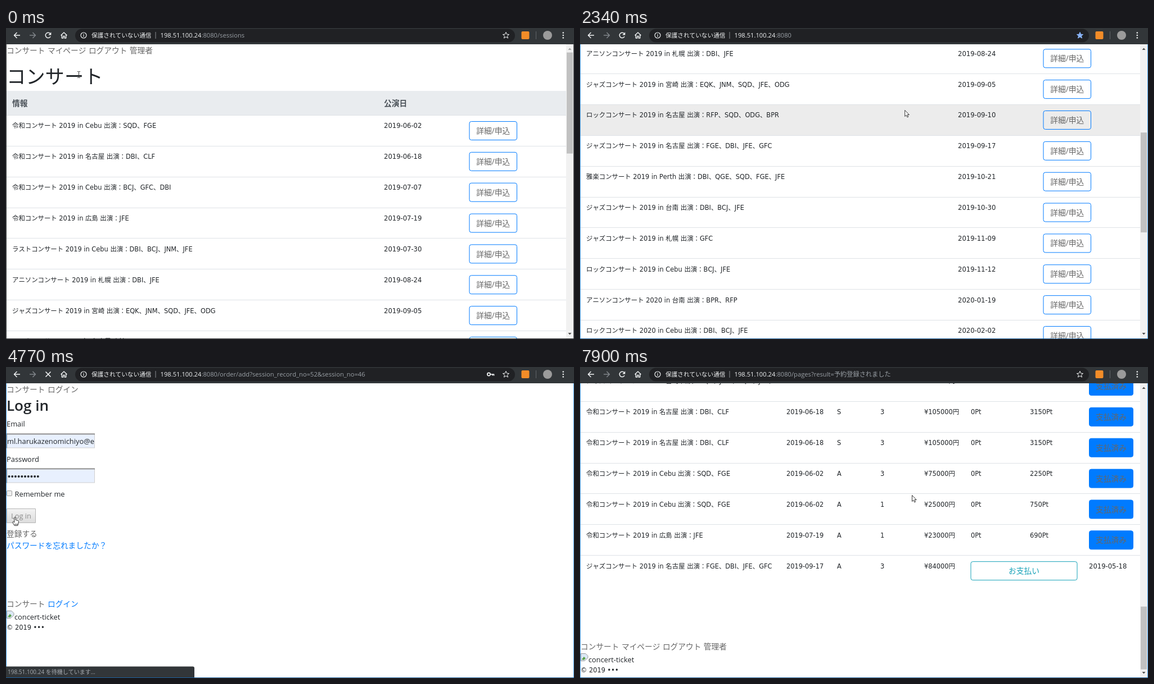
An HTML page with a canvas for the animation above (8000 ms loop, 1010 by 554 pixels).

```html
<!DOCTYPE html>
<html lang="ja">
<head>
<meta charset="utf-8">
<title>チケット予約</title>
<style>
html, body { margin: 0; width: 100%; height: 100%; overflow: hidden; background: #fff; }
canvas { display: block; }
</style>
</head>
<body>
<canvas id="stage" width="1010" height="554"></canvas>
<script>
const g = document.getElementById('stage').getContext('2d');
g.fontKerning = 'none';

const CJK = '"Noto Sans CJK JP", "Noto Sans CJK", sans-serif';
const UI = '"Open Sans", ' + CJK, WIDE = '"DejaVu Sans", ' + CJK;
const EM = 13.71, LATIN = 12.85, SMALL = 11.4, ROW = 54.857;
const INK = '#212529', GRAY = '#666', BLUE = '#007bff', TEAL = '#17a2b8';
const HOST = '198.51.100.24', PORT = ':8080';
const WAIT = HOST + ' を待機しています...';
const ORDER = '/order/add?session_record_no=52&session_no=46';
const MEMBER = ['コンサート', 'マイページ', 'ログアウト', '管理者'];
const GUEST = ['コンサート', 'ログイン'];

const concerts = `令和 2019-06-02 Cebu SQD、FGE
令和 2019-06-18 名古屋 DBI、CLF
令和 2019-07-07 Cebu BCJ、GFC、DBI
令和 2019-07-19 広島 JFE
ラスト 2019-07-30 Cebu DBI、BCJ、JNM、JFE
アニソン 2019-08-24 札幌 DBI、JFE
ジャズ 2019-09-05 宮崎 EQK、JNM、SQD、JFE、ODG
ロック 2019-09-10 名古屋 RFP、SQD、ODG、BPR
ジャズ 2019-09-17 名古屋 FGE、DBI、JFE、GFC
雅楽 2019-10-21 Perth DBI、QGE、SQD、FGE、JFE
ジャズ 2019-10-30 台南 DBI、BCJ、JFE
ジャズ 2019-11-09 札幌 GFC
ロック 2019-11-12 Cebu BCJ、JFE
アニソン 2020-01-19 台南 BPR、RFP
ロック 2020-02-02 Cebu DBI、BCJ、JFE
雅楽 2020-02-06 広島 BCJ、DBI、QGE
ロック 2020-02-12 札幌 ODG
ジャズ 2020-02-23 Perth SQD、GFC
ラスト 2020-03-08 宮崎 JFE、BPR
アニソン 2020-03-15 広島 DBI、CLF
雅楽 2020-03-29 台南 QGE、FGE`.split('\n').map(line => {
  const [genre, date, city, acts] = line.split(' ');
  return { date, title: `${genre}コンサート ${date.slice(0, 4)} in ${city} 出演：${acts}` };
});

// Bookings: [concert, seat, count, unit price]; the newest ones are at the end.
const bookings = Array.from({ length: 31 }, (_, i) => [i * 5 % 8, 'SA'[i % 2], 1 + i % 3, i % 2 ? 25000 : 35000])
  .concat([[1, 'S', 3, 35000], [1, 'S', 3, 35000], [0, 'A', 3, 25000], [0, 'A', 1, 25000], [3, 'A', 1, 23000], [8, 'A', 3, 28000]]);

// The screen refreshes in bursts: [first, last, count].
const refreshes = [0];
for (const [a, b, n] of [[130, 460, 4], [600, 600, 1], [780, 1540, 8], [1770, 2570, 9], [2690, 2890, 3],
  [3120, 3700, 6], [3900, 4340, 5], [4550, 5320, 8], [5420, 6160, 8], [6270, 6270, 1], [6410, 6710, 4],
  [6920, 7720, 8], [7820, 7900, 2]])
  for (let i = 0; i < n; i++) refreshes.push(Math.floor((a + (b - a) * i / Math.max(1, n - 1)) / 10 + 1e-6) * 10);

const pathKeys = [[130, 129, 83], [460, 38, 40], [780, 38, 40], [1210, 380, 96], [2070, 380, 96], [2570, 873, 221],
  [3120, 873, 221], [3700, 866, 232], [4120, 866, 232], [4340, 560, 246], [4660, 16, 267], [4880, 16, 267],
  [5320, 72, 107], [5520, 72, 107], [6050, 66, 160], [6410, 66, 160], [6600, 48, 148], [6920, 48, 148], [7370, 590, 228]];
const listScroll = [[1210, 0], [1320, 81], [1430, 500], [1540, 934], [1770, 820], [1870, 544], [1970, 440], [2070, 420]];
const userScroll = [[7370, 0], [7490, 120], [7600, 480], [7720, 1000], [7820, 1500], [7900, 1794.7]];

function track(keys, t, col = 1) {
  const i = keys.findIndex(k => k[0] > t);
  if (i < 0) return keys[keys.length - 1][col];
  if (!i) return keys[0][col];
  const a = keys[i - 1], b = keys[i];
  return a[col] + (b[col] - a[col]) * (t - a[0]) / (b[0] - a[0]);
}
const within = (t, ...spans) => spans.some(([a, b]) => t >= a && t < b);
const step = (t, list) => list.filter(s => s[0] <= t).pop()[1];

function box(x, y, w, h, fill) { g.fillStyle = fill; g.fillRect(x, y, w, h); }
function round(x, y, w, h, r, fill, line) {
  g.beginPath();
  g.roundRect(x, y, w, h, r);
  if (fill) { g.fillStyle = fill; g.fill(); }
  if (line) { g.strokeStyle = line; g.lineWidth = 1; g.stroke(); }
}
// y is the vertical middle of the line
function text(s, x, y, size = SMALL, color = INK, font = WIDE, weight = 400, align = 'left') {
  g.font = `${weight} ${size}px ${font}`;
  g.textAlign = align;
  g.fillStyle = color;
  g.fillText(s, x, y + size * .37);
}
function shape(d, x, y, fill, line, width = 1) {
  const p = new Path2D(d);
  g.save();
  g.translate(x, y);
  g.lineWidth = width;
  g.lineJoin = 'round';
  if (fill) { g.fillStyle = fill; g.fill(p); }
  if (line) { g.strokeStyle = line; g.stroke(p); }
  g.restore();
}

function nav(words, y, lastColor = GRAY) {
  let x = 1;
  words.forEach((w, i) => {
    text(w, x, y, EM, i && i == words.length - 1 ? lastColor : GRAY, UI);
    x += w.length * EM + 4.4;
  });
}
function footer(words, y, lastColor) {
  nav(words, y, lastColor);
  shape('M.5 .5H9L13 4.5V8L7 13.5H.5Z', 1, y + 12, '#dce8f5', '#9a9a9a');
  shape('M2 11L6 6L9 9L6 12Z', 1, y + 12, '#5ca04a');
  text('concert-ticket', 15, y + 23.5, LATIN, INK, UI);
  text('© 2019 •••', 1, y + 41.5);
}
function button(s, x, y, w, color, fill, ink) {
  round(x + .5, y + .5, w - 1, 33, 3.5, fill, color);
  text(s, x + w / 2, y + 17, EM, ink, UI, 400, 'center');
}
function classicButton(s, y, w, off) {
  const shade = g.createLinearGradient(0, y, 0, y + 26);
  shade.addColorStop(0, '#f4f4f4');
  shade.addColorStop(1, '#dcdcdc');
  round(1.5, y + .5, w, 25, 0, shade, off ? '#b5b5b5' : '#8a8a8a');
  text(s, 1.5 + w / 2, y + 13, s == 'Log in' ? LATIN : EM, off ? '#8c8c8c' : '#111', UI, 400, 'center');
}
function scrollbar(pos, content) {
  const view = 524, size = 495 * view / content;
  box(996, 29, 13, 525, '#f1f1f1');
  box(997, 43.6 + pos / (content - view) * (495 - size), 11, size, '#c1c1c1');
  shape('M-3 2L0 -1.5L3 2Z', 1002.5, 37, pos ? '#505050' : '#a3a3a3');
  shape('M-3 -2L0 1.5L3 -2Z', 1002.5, 545, '#505050');
}
// Page with a title and a table; drawRow gets the row index and its top edge.
function tablePage(title, heads, count, offset, width, hover, drawRow) {
  nav(MEMBER, 40 + offset);
  text(title, 1, 86 + offset, 34.3, INK, UI);
  const top = 155.5 + offset;
  box(1, top - 43.5, width, 43.5, '#e9ecef');
  for (const [x, s] of heads) text(s, x, top - 21.5, EM, '#495057', UI, 700);
  for (let i = 0; i < count; i++) {
    const y = top + i * ROW;
    if (y < -60 || y > 560) continue;
    if (i == hover) box(1, y, width, ROW, '#ececec');
    box(1, Math.round(y - .5), width, 1, '#dee2e6');
    drawRow(i, y);
  }
  footer(MEMBER, top + count * ROW + 107.5);
}

function listPage(t, cy) {
  const lead = t < 780 ? 0 : 17, pos = track(listScroll, t), offset = lead - pos;
  const hover = t < 1540 ? -1 : t < 2070 ? 15 : Math.floor((cy - 155.5 - offset) / ROW);
  tablePage('コンサート', [[11, '情報'], [672, '公演日']], concerts.length, offset, 995, hover, (i, y) => {
    const on = t >= 2570 && i == hover;
    text(concerts[i].title, 11, y + 18.7);
    text(concerts[i].date, 672, y + 18.7, 11.6);
    if (on && t >= 2890) round(821, y + 8.5, 90, 39, 5, 'rgba(0,123,255,.5)');
    button('詳細/申込', 823.5, y + 10.5, 85.5, BLUE, on && BLUE, on ? '#fff' : GRAY);
  });
  scrollbar(pos, 1441 + lead);
}

function detailPage(t, cy) {
  const hover = Math.floor((cy - 155.5) / ROW);
  tablePage('コンサート詳細', [[11, '情報'], [457, '席種'], [672, '料金']], 2, 0, 1008, hover, (i, y) => {
    const on = t >= 3580 && i == hover;
    text(concerts[8].title, 11, y + 18.7);
    text('SA'[i], 457, y + 18.7);
    text(['¥35000円', '¥28000円'][i], 672, y + 18.7);
    button('申込', 823.5, y + 10.5, 85.5, BLUE, on && BLUE, on ? '#fff' : GRAY);
  });
}

function field(y) {
  box(0, y, 158, 26, '#d0d0d0');
  box(0, y, 158, 2, '#8b8b8b');
  box(0, y, 2, 26, '#8b8b8b');
  box(2, y + 2, 155, 23, '#e8f0fe');
}
function loginPage(t) {
  nav(GUEST, 40);
  text('Log in', 1, 68, 26, INK, UI, 600);
  text('Email', 1, 101.5, LATIN, INK, UI);
  field(118.5);
  g.save();
  g.beginPath();
  g.rect(2, 120, 155, 24);
  g.clip();
  text('ml.harukazenomichiyo@exa', 2, 132, LATIN, INK, UI);
  g.restore();
  text('Password', 1, 164, LATIN, INK, UI);
  field(180.5);
  for (let i = 0; i < 10; i++) { g.beginPath(); g.arc(5.5 + i * 5.7, 195, 2, 0, 7); g.fillStyle = INK; g.fill(); }
  round(1.5, 220.5, 9, 9, 1.5, '#eee', '#a0a0a0');
  text('Remember me', 15.5, 226.5, LATIN, INK, UI);
  classicButton('Log in', 252, 51, t >= 4770);
  text('登録する', 1, 297, EM, GRAY, UI);
  text('パスワードを忘れましたか？', 1, 318, EM, BLUE, UI);
  footer(GUEST, 422, BLUE);
}

function orderPage(t, cy) {
  nav(MEMBER, 40);
  text('購入ページ', 1, 72, 34.3, INK, UI);
  text('購入席数', 1, 110, EM, INK, UI);
  text('席', 88.5, 110, EM, INK, UI);
  classicButton('購入する', 136, 69);
  text('戻る', 12, 188, EM, GRAY, UI);
  round(59.5, 98.5, 29, 22, 0, '#fff', t < 5420 ? '#a9a9a9' : '#3b82e0');
  text(t < 6270 ? '1' : '3', 64, 110, LATIN, INK, UI);
  shape('M-2.6 -2H2.6L0 2.6Z', 79.5, 110, '#111');
  if (within(t, [5420, 6270])) {
    round(59.5, 121.5, 28, 78, 0, '#fff', '#7a9cc6');
    const pick = Math.max(0, Math.min(4, Math.floor((cy - 121) / 15.7)));
    box(60, 122 + pick * 15.5, 27, 15.5, '#1e90ff');
    for (let i = 0; i < 5; i++) text(i + 1, 64, 129.8 + i * 15.5, LATIN, i == pick ? '#fff' : INK, UI);
  }
  footer(MEMBER, 276.5);
}

function userPage(t) {
  const pos = track(userScroll, t);
  const xs = [11, 367, 457, 534, 612, 695, 800, 905];
  const heads = ['情報', '公演日', '席種', '席数', '料金', '使用Pt', '獲得Pt', '支払'].map((s, i) => [xs[i], s]);
  tablePage('マイページ', heads, bookings.length, -pos, 995, -1, (i, y) => {
    const [id, seat, n, price] = bookings[i], cost = n * price, open = i == bookings.length - 1;
    const cells = [concerts[id].title, concerts[id].date, seat, n, `¥${cost}円`];
    if (!open) cells.push('0Pt', cost * .03 + 'Pt');
    cells.forEach((s, k) => text(s, xs[k], y + 18.7));
    if (open) {
      button('お支払い', 694.5, y + 10.5, 190, TEAL, null, TEAL);
      text('2019-05-18', 905, y + 18.7, 11.6);
    } else button('支払済み', 905, y + 10.5, 79, BLUE, BLUE, '#666');
  });
  scrollbar(pos, 2318.7);
}

function toolbar(t) {
  const white = '#f1f3f4';
  box(0, 0, 1010, 29, '#323639');
  round(123, 1.5, 782, 24, 12, '#202124');
  shape('M5.5 0H-5M0 -5L-5 0L0 5', 19.5, 13, null, white, 1.5);
  shape('M-5.5 0H5M0 -5L5 0L0 5', 47.5, 13, null, '#808589', 1.5);
  if (within(t, [600, 780], [3900, 4120], [4770, 4880], [6710, 6920]))
    shape('M-4.5 -4.5L4.5 4.5M4.5 -4.5L-4.5 4.5', 75, 13, null, white, 1.6);
  else {
    shape('M4.2 2A4.7 4.7 0 1 1 3.4 -3.4', 75, 13, null, white, 1.5);
    shape('M5.3 -5.6V-.6H.3Z', 75, 13, white);
  }
  shape('M-5.5 .3L0 -5L5.5 .3M-3.7 -.8V5H-1.2V1.4H1.2V5H3.7V-.8', 103, 13, null, white, 1.4);
  shape('M5 0A5 5 0 1 1 -5 0A5 5 0 1 1 5 0M0 -.8V2.8M0 -2.8V-1.6', 138, 13, null, white, 1.2);
  text('保護されていない通信', 152, 13, 10.65, white, UI);
  box(265.5, 7, 1, 12, '#8a8d91');
  text(HOST, 274.5, 13, 11.2, white, UI);
  const path = step(t, [[0, '/sessions'], [780, ''], [2890, '/sessions/13'], [4120, ORDER], [6920, '/pages?result=予約登録されました']]);
  text(PORT + path, 274.5 + g.measureText(HOST).width, 13, 11.2, '#9aa0a6', UI);
  if (within(t, [4120, 4880])) {
    shape('M2.6 0A2.6 2.6 0 1 1 -2.6 0A2.6 2.6 0 1 1 2.6 0M2.6 0H9V2.6M6.5 0V2.2', 858.5, 13, null, white, 1.7);
  }
  const marked = within(t, [780, 2890]);
  shape('M0 -5.6L1.6 -1.8L5.6 -1.5L2.5 1.1L3.5 5.1L0 2.9L-3.5 5.1L-2.5 1.1L-5.6 -1.5L-1.6 -1.8Z', 889, 13,
    marked ? '#8ab4f8' : null, marked ? '#8ab4f8' : white);
  round(916.5, 6, 14, 14, 2, '#f28c28');
  box(942, 6, 1, 14, '#5f6368');
  round(955, 5, 16, 16, 8, '#9b9b9b');
  for (const y of [8.5, 13, 17.5]) round(989.5, y - 1.3, 2.6, 2.6, 1.3, white);
}

function statusBar(t) {
  const s = step(t, [[0, ''], [460, HOST + PORT + '/'], [600, WAIT], [780, ''], [2690, HOST + PORT + '/sessions/13'],
    [3120, ''], [3580, HOST + PORT + ORDER], [3900, WAIT], [4120, ''], [4770, WAIT], [4880, '']]);
  if (!s) return;
  round(0, 533.5, 335, 20, [0, 3, 0, 0], '#323639');
  text(s, 3, 543.5, 10, '#a6abb0', UI);
}

function pointer(t, x, y) {
  const kind = step(t, [[0, 'beam'], [240, 'arrow'], [460, 'hand'], [880, 'arrow'], [2570, 'hand'], [3120, 'arrow'],
    [3580, 'hand'], [4120, 'arrow'], [4660, 'hand'], [4880, 'arrow'], [6410, 'hand'], [6920, 'arrow']]);
  if (kind == 'beam')
    shape('M-2.5 -5.5H-.8L0 -5L.8 -5.5H2.5M0 -5V5M-2.5 5.5H-.8L0 5L.8 5.5H2.5', x + .5, y, null, '#333');
  else if (kind == 'arrow')
    shape('M.5 .5V11.5L3 9.2L4.8 13L6.6 12.2L4.9 8.5H8.2Z', x, y, '#fff', '#222', .9);
  else
    shape('M-1.2 1.5C-1.2 0 1.2 0 1.2 1.5V5.5L5 6.3C6.2 6.6 6.5 7.2 6.4 8.5L5.8 12L4.8 15.5H-1L-4 10.5C-5 9 -3.4 8 -2.3 9L-1.2 10ZM-1 13.2H5',
      x, y, '#fff', '#222', .95);
}

function draw() {
  const now = performance.now() % 8000;
  const t = refreshes.filter(r => r <= now).pop();
  const x = track(pathKeys, t), y = track(pathKeys, t, 2);
  box(0, 0, 1010, 554, '#fff');
  step(t, [[0, listPage], [3120, detailPage], [4120, loginPage], [4880, orderPage], [6920, userPage]])(t, y);
  toolbar(t);
  const edge = t < 130 ? '#3c3f42' : '#3f97e0';
  box(0, 29, 1, 525, edge);
  box(1009, 29, 1, 525, edge);
  statusBar(t);
  box(0, 553, 1010, 1, t < 130 ? '#2a2d30' : '#1a5f9c');
  pointer(t, x, y);
  requestAnimationFrame(draw);
}
draw();
</script>
</body>
</html>
```
